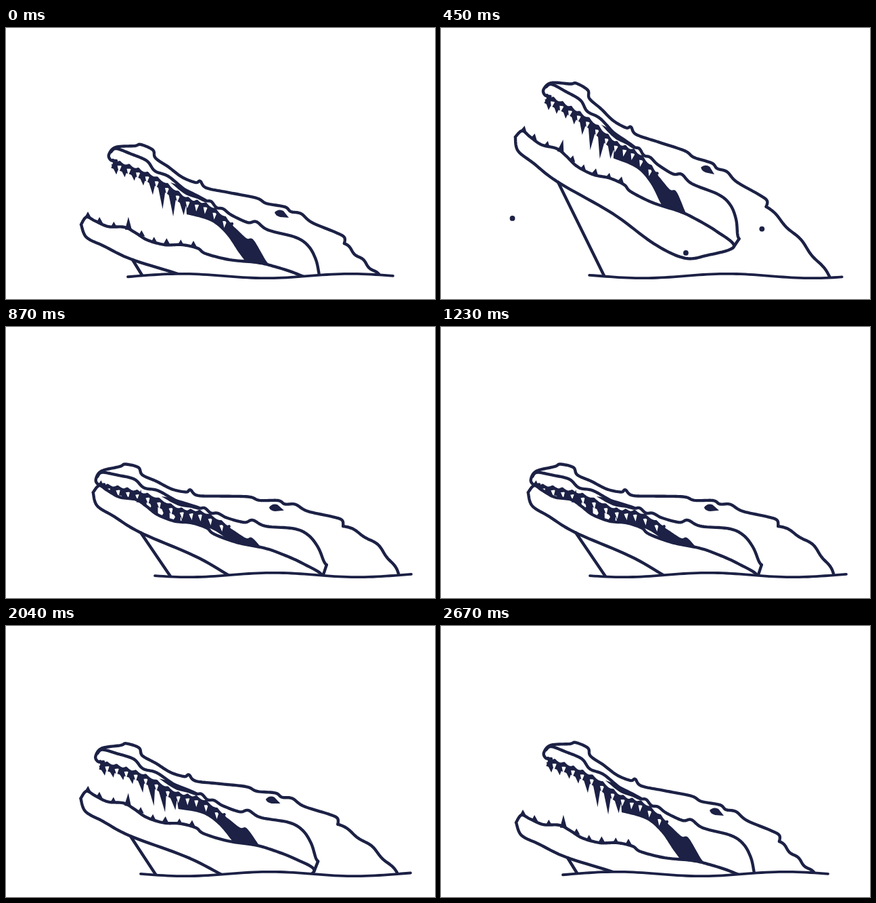
An HTML page with a canvas that plays this animation: 634 by 400 pixels, repeating every 2.7 s.

```html
<!DOCTYPE html>
<html lang="en">
<head>
<meta charset="utf-8">
<title>Crocodile</title>
<style>
html, body { margin: 0; width: 100%; height: 100%; overflow: hidden; background: #fff; }
canvas { display: block; }
</style>
</head>
<body>
<canvas id="stage" width="634" height="400"></canvas>
<script>
const ctx = document.getElementById('stage').getContext('2d');
const LOOP = 2700, INK = '#1c2145', DEG = Math.PI / 180;

const points = text => text.split(',').map(p => p.trim().split(/\s+/).map(Number));

// Point at u (0 to 1) on the smooth curve through pts
function along(pts, u) {
  const last = pts.length - 1, i = Math.min(Math.floor(u * last), last - 1), f = u * last - i;
  const [a, b, c, d] = [i - 1, i, i + 1, i + 2].map(k => pts[Math.max(0, Math.min(last, k))]);
  return [0, 1].map(k => b[k] + f / 2 * (c[k] - a[k] +
    f * (2 * a[k] - 5 * b[k] + 4 * c[k] - d[k] + f * (3 * (b[k] - c[k]) + d[k] - a[k]))));
}

function polygon(pts) {
  const path = new Path2D();
  pts.forEach(p => path.lineTo(...p));
  return path;
}

function trace(count, pointAt) {
  return polygon(Array.from({ length: count + 1 }, (_, i) => pointAt(i / count)));
}

const smooth = pts => trace(pts.length * 10, u => along(pts, u));
const curve = text => smooth(points(text));

function fill(path, color = INK) {
  ctx.fillStyle = color;
  ctx.fill(path);
}

function spike(x, y, halfWidth, dx, dy, color) {
  fill(polygon([[x - halfWidth, y], [x + dx, y + dy], [x + halfWidth, y]]), color);
}

// Head, in the coordinates of the resting pose
const EYE = [406, 274], NAPE = [500, 318], CHEEK_END = [466, 370];
const skull = curve(`163 196, 155 195, 152 187, 162 176, 190 174, 199 172, 217 180, 221 192,
  240 205, 260 220, 280 228, 287 226, 296 236, 330 243, 370 251, 385 259, 412 264, 421 271,
  436 274, 452 287, 488 302, 500 309, 500 318`);
const lip = curve(`155 183, 163 178, 185 186, 208 196, 220 211, 240 219, 265 239, 292 254,
  303 256, 311 265, 321 267, 333 276, 357 287, 370 286, 387 298, 428 309, 447 322, 458 342,
  463 364, 466 370`);
const cheekShade = curve('243 228, 262 235, 298 254, 268 247, 243 228');
const throatShade = curve(`266 256, 300 266, 334 291, 355 310, 366 313, 386 346, 403 363,
  367 365, 354 345, 343 330, 325 304, 302 285, 267 275`);
const eye = new Path2D('M397 272Q403 266 410 270L418 280L405 279Q398 277 397 272Z');
const toothRow = points('158 197, 190 208, 226 225, 266 252, 300 264, 334 291');
const TEETH = 13;
const gum = trace(130, u => {
  const [x, y] = along(toothRow, u);
  return [x, y - 2 + 3 * Math.abs(Math.sin(Math.PI * TEETH * u))];
});
const gumShade = trace(50, u => {
  const [x, y] = along(toothRow, u);
  return [x - 1, y + 5];
});

function drawHead() {
  [throatShade, cheekShade, eye].forEach(p => fill(p));
  ctx.save();
  ctx.lineWidth = 10;
  ctx.lineCap = 'butt';
  ctx.stroke(gumShade);
  ctx.restore();
  for (let i = 0; i < 8; i++) {
    const [x, y] = along(toothRow, (i + 0.5) / TEETH);
    const length = 18 + 24 * Math.exp(-(((i - 5.5) / 1.5) ** 2));
    spike(x, y + 3, 6.5, 1, length - 3);
  }
  for (let i = 1; i < TEETH; i++) {
    const [x, y] = along(toothRow, i / TEETH);
    spike(x, y + 3, 3.2, -1, 10, '#fff');
  }
  [gum, lip, skull].forEach(p => ctx.stroke(p));
}

// Lower jaw, in the coordinates of the widest bite; it turns on the head at the hinge
const HINGE = [410, 311], SOCKET = [435, 369], CHIN = [162, 284], JAW_END = [436, 322];
const jaw = curve(`86 232, 94 221, 107 227, 126 235, 150 236, 166 244, 184 255, 210 262, 235 262,
  258 267, 270 275, 305 284, 345 288, 368 293, 405 305, 436 322, 400 343, 368 354, 320 343,
  250 312, 162 284, 120 264, 94 251, 86 232`);
const ridge = points('96 222, 126 235, 160 241, 190 258, 220 262, 252 265');

function drawJaw() {
  fill(jaw, '#fff');
  ctx.stroke(jaw);
  for (let i = 0; i < 9; i++) {
    const [x, y] = along(ridge, i / 8);
    spike(x, y, 5, 0, i === 3 ? -19 : -9);
  }
}

// time, eye x and y, head turn, bite angle, water left and right, wave crest
const rest = [406, 274, 0, 0, 180, 572, 510];
const closed = [398, 267, -10, 15.8, 220, 599, 395];
const poses = [
  [0, ...rest],
  [240, 410, 213, 18.8, -19, 200, 588, 470],
  [540, 385, 208, 0.5, 14, 225, 594, 410],
  [630, 381, 223, -5.2, 16.5, 228, 595, 405],
  [870, ...closed],
  [1320, ...closed],
  [1560, 397, 262, -7.3, 11.8, 216, 603, 365],
  [2040, 393, 257, -5, 7.8, 199, 598, 390],
  [2640, ...rest],
  [LOOP, ...rest]
];

// Cubic interpolation that never overshoots a pose
function poseAt(t) {
  const i = poses.findIndex((p, n) => t < poses[n + 1][0]);
  const a = poses[i], b = poses[i + 1], span = b[0] - a[0], u = (t - a[0]) / span;
  const slope = (n, c) => poses[n] && poses[n + 1]
    ? (poses[n + 1][c] - poses[n][c]) / (poses[n + 1][0] - poses[n][0]) : 0;
  const tangent = (p, q) => p * q > 0 ? 2 * p * q / (p + q) : 0;
  return a.slice(1).map((v, k) => {
    const c = k + 1, s = slope(i, c);
    const m = tangent(slope(i - 1, c), s) * span, n = tangent(s, slope(i + 1, c)) * span;
    return v + (b[c] - v) * u * u * (3 - 2 * u) + m * u * (1 - u) ** 2 - n * u * u * (1 - u);
  });
}

function place([x, y], pivot, to, turn) {
  const c = Math.cos(turn), s = Math.sin(turn), dx = x - pivot[0], dy = y - pivot[1];
  return [to[0] + dx * c - dy * s, to[1] + dx * s + dy * c];
}

function posed(pivot, to, turn, draw) {
  ctx.save();
  ctx.translate(...to);
  ctx.rotate(turn);
  ctx.translate(-pivot[0], -pivot[1]);
  draw();
  ctx.restore();
}

const drops = [
  { x: 220, y: 350, vx: -0.648, vy: -0.454, drag: 0.0005, end: 670 },
  { x: 484, y: 337, vx: -0.046, vy: -0.318, drag: 0, end: 770 },
  { x: 437, y: 336, vx: -0.356, vy: -0.146, drag: 0, end: 645 }
];

function drawDrops(t) {
  const d = t - 240;
  for (const { x, y, vx, vy, drag, end } of drops) {
    if (d < -40 || t > end) continue;
    const dot = new Path2D();
    dot.arc(x + vx * d + drag * d * d, y + vy * d + 0.0006 * d * d, 3.9, 0, 7);
    fill(dot);
  }
}

function render(t) {
  const [eyeX, eyeY, turn, bite, left, right, crest] = poseAt(t);
  const headPose = [EYE, [eyeX, eyeY], turn * DEG], jawPose = [HINGE, SOCKET, bite * DEG];
  const onHead = p => place(p, ...headPose), onJaw = p => onHead(place(p, ...jawPose));
  const surface = u => {
    const x = left + (right - left) * u;
    return [x, 366 - 3.2 * Math.cos((x - crest) / 40)];
  };
  const water = trace(60, surface), air = new Path2D(water);
  [[634, 366], [634, 0], [0, 0], [0, 366]].forEach(p => air.lineTo(...p));

  // The nape swells as the mouth closes
  const nape = onHead(NAPE), foot = [right - 18, 368];
  const neck = trace(40, u => {
    const swell = bite * 3.2 * u * (1 - u) + 1.6 * Math.sin(5 * Math.PI * u);
    return [nape[0] + (foot[0] - nape[0]) * u + swell * 0.7,
      nape[1] + (foot[1] - nape[1]) * u - swell * 0.7];
  });

  ctx.fillStyle = '#fff';
  ctx.fillRect(0, 0, 634, 400);
  ctx.strokeStyle = INK;
  ctx.lineWidth = 4.4;
  ctx.lineCap = ctx.lineJoin = 'round';

  ctx.save();
  ctx.clip(air);
  posed(...headPose, () => {
    drawHead();
    posed(...jawPose, drawJaw);
  });
  ctx.stroke(neck);
  ctx.stroke(polygon([onJaw(CHIN), [left + 23, 368]]));
  ctx.stroke(polygon([onHead(CHEEK_END), onJaw(JAW_END)]));
  ctx.restore();

  ctx.lineWidth = 3.8;
  ctx.stroke(water);
  drawDrops(t);
}

const start = performance.now();
function tick() {
  render((performance.now() - start) % LOOP);
  requestAnimationFrame(tick);
}
tick();
</script>
</body>
</html>
```
